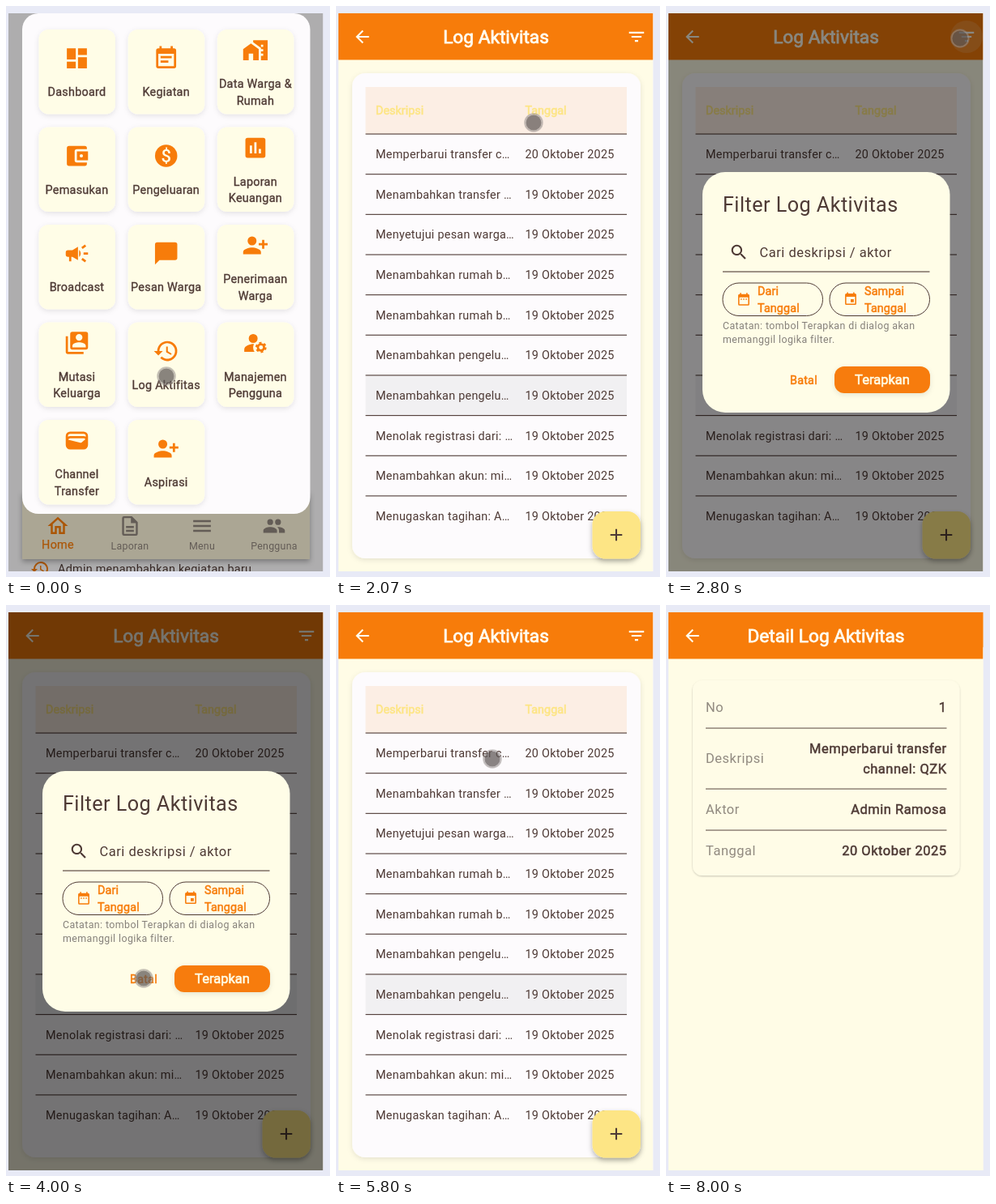
Animation of 400 by 705 pixels, one loop 8.07 s. Source, as an HTML page:

```html
<!DOCTYPE html>
<html lang="id">
<head>
<meta charset="utf-8">
<title>Log Aktivitas</title>
<style>
html, body { margin: 0; width: 100%; height: 100%; overflow: hidden; background: #e8eaf6; }
svg { display: block; width: 400px; height: 705px; font-family: Roboto, Arial, sans-serif; }
text { white-space: pre; }
</style>
</head>
<body>
<svg id="stage" viewBox="0 0 400 705"></svg>
<script>
const LOOP = 8070;
const ORANGE = '#f77c0a', BROWN = '#4e3a35', CREAM = '#fffce6', PAPER = '#fdfbfd', GOLD = '#fde585';
const CX = 197.5, CY = 353;

const icons = {
  dashboard: 'M3 13h8V3H3zm0 8h8v-6H3zm10 0h8V11h-8zm0-18v6h8V3z',
  note: 'M17 10H7v2h10zm2-7h-1V1h-2v2H8V1H6v2H5a2 2 0 0 0-2 2v14a2 2 0 0 0 2 2h14a2 2 0 0 0 2-2V5a2 2 0 0 0-2-2zm0 16H5V8h14zm-5-5H7v2h7z',
  houses: 'M1 11v10h5v-6h4v6h5V11L8 6zM10 3v1.97l7 5V11h2v2h-2v2h2v2h-2v4h6V3zm9 6h-2V7h2z',
  wallet: 'M21 18v1a2 2 0 0 1-2 2H5a2 2 0 0 1-2-2V5a2 2 0 0 1 2-2h14a2 2 0 0 1 2 2v1h-9a2 2 0 0 0-2 2v8a2 2 0 0 0 2 2zm-9-2h10V8H12zm4-2.5a1.5 1.5 0 1 1 0-3 1.5 1.5 0 0 1 0 3z',
  chart: 'M19 3H5a2 2 0 0 0-2 2v14a2 2 0 0 0 2 2h14a2 2 0 0 0 2-2V5a2 2 0 0 0-2-2zM9 17H7v-7h2zm4 0h-2V7h2zm4 0h-2v-4h2z',
  horn: 'M18 11v2h4v-2zm-2 6.6 3.2 2.4 1.2-1.6-3.2-2.4zM20.4 5.6 19.2 4 16 6.4 17.2 8zM4 9a2 2 0 0 0-2 2v2a2 2 0 0 0 2 2h1v4h2v-4h1l5 3V6L8 9zm11.5 3A4.5 4.5 0 0 0 14 8.65v6.7A4.5 4.5 0 0 0 15.5 12z',
  chat: 'M20 2H4a2 2 0 0 0-2 2v18l4-4h14a2 2 0 0 0 2-2V4a2 2 0 0 0-2-2z',
  addUser: 'M13 8a4 4 0 1 0-8 0 4 4 0 0 0 8 0zm2 2v2h3v3h2v-3h3v-2h-3V7h-2v3zM1 18v2h16v-2c0-2.66-5.33-4-8-4s-8 1.34-8 4z',
  album: 'M4 6H2v14a2 2 0 0 0 2 2h14v-2H4zm16-4H8a2 2 0 0 0-2 2v12a2 2 0 0 0 2 2h12a2 2 0 0 0 2-2V4a2 2 0 0 0-2-2zm-6 2a3 3 0 1 1 0 6 3 3 0 0 1 0-6zm6 12H8v-1.5c0-2 4-3 6-3s6 1 6 3z',
  history: 'M13 3a9 9 0 0 0-9 9H1l4 4 4-4H6a7 7 0 1 1 2.06 4.94l-1.42 1.42A9 9 0 1 0 13 3zm-1 5v5l4.28 2.54.72-1.21-3.5-2.08V8z',
  manage: 'M14 8a4 4 0 1 0-8 0 4 4 0 0 0 8 0zM10.67 13C7.5 12.9 2 14.5 2 18v2h9.26a7 7 0 0 1-.59-7z',
  purse: 'M18 4H6a4 4 0 0 0-4 4v8a4 4 0 0 0 4 4h12a4 4 0 0 0 4-4V8a4 4 0 0 0-4-4zm-1.86 9.77a1 1 0 0 1-.88.2L4.15 11.25A2 2 0 0 1 6 10h12c.67 0 1.26.34 1.63.84zM6 6h12a2 2 0 0 1 2 2v.55A4 4 0 0 0 18 8H6a4 4 0 0 0-2 .55V8a2 2 0 0 1 2-2z',
  home: 'M12 5.69l5 4.5V18h-2v-6H9v6H7v-7.81zM12 3 2 12h3v8h6v-6h2v6h6v-8h3z',
  page: 'M8 16h8v2H8zm0-4h8v2H8zm6-10H6a2 2 0 0 0-2 2v16a2 2 0 0 0 2 2h12a2 2 0 0 0 2-2V8zm4 18H6V4h7v5h5z',
  menu: 'M3 18h18v-2H3zm0-5h18v-2H3zm0-7v2h18V6z',
  people: 'M16 11a3 3 0 1 0-3-3 3 3 0 0 0 3 3zm-8 0a3 3 0 1 0-3-3 3 3 0 0 0 3 3zm0 2c-2.33 0-7 1.17-7 3.5V19h14v-2.5C15 14.17 10.33 13 8 13zm8 0-1 .05c1.2.84 2 1.97 2 3.45V19h6v-2.5c0-2.33-4.67-3.5-7-3.5z',
  back: 'M20 11H7.83l5.59-5.59L12 4l-8 8 8 8 1.41-1.41L7.83 13H20z',
  filter: 'M10 18h4v-2h-4zM3 6v2h18V6zm3 7h12v-2H6z',
  search: 'M15.5 14h-.8l-.3-.3a6.5 6.5 0 1 0-.7.7l.3.3v.8l5 5 1.5-1.5zm-6 0a4.5 4.5 0 1 1 0-9 4.5 4.5 0 0 1 0 9z',
  range: 'M9 11H7v2h2zm4 0h-2v2h2zm4 0h-2v2h2zm2-7h-1V2h-2v2H8V2H6v2H5a2 2 0 0 0-2 2v14a2 2 0 0 0 2 2h14a2 2 0 0 0 2-2V6a2 2 0 0 0-2-2zm0 16H5V9h14z',
  event: 'M17 12h-5v5h5zM16 1v2H8V1H6v2H5a2 2 0 0 0-2 2v14a2 2 0 0 0 2 2h14a2 2 0 0 0 2-2V5a2 2 0 0 0-2-2h-1V1zm3 18H5V8h14z',
  plus: 'M19 13h-6v6h-2v-6H5v-2h6V5h2v6h6z'
};

const rect = (x, y, x2, y2, fill, r = 0, extra = '') =>
  `<rect x="${x}" y="${y}" width="${x2 - x}" height="${y2 - y}" rx="${r}" fill="${fill}" ${extra}/>`;
const rule = (x, x2, y, color = BROWN) => rect(x, y - .5, x2, y + .6, color);
const group = (id, body, extra = '') => `<g id="${id}" ${extra}>${body}</g>`;

function label(s, x, y, { size = 14.4, gap = .26, fill = BROWN, at = 'start', bold = 0, weight = 400 } = {}) {
  const heavy = bold ? `stroke="${fill}" stroke-width="${bold}"` : '';
  return `<text x="${x}" y="${y}" font-size="${size}" letter-spacing="${gap}" fill="${fill}" text-anchor="${at}" font-weight="${weight}" ${heavy}>${s}</text>`;
}

function icon(name, x, y, size, fill) {
  let body;
  if (name === 'coin') {
    body = `<circle cx="12" cy="12" r="10"/>` +
      label('$', 12, 17.6, { size: 16, gap: 0, fill: CREAM, at: 'middle', weight: 500 });
  } else {
    body = `<path fill-rule="evenodd" d="${icons[name]}"/>`;
    if (name === 'manage') body += `<g fill="none" stroke="${fill}">
      <circle cx="17" cy="16" r="2.8" stroke-width="2"/>
      <circle cx="17" cy="16" r="4.2" stroke-width="1.6" stroke-dasharray="2.2 2.198"/></g>`;
  }
  const k = size / 24;
  return `<g fill="${fill}" transform="translate(${x - size / 2} ${y - size / 2}) scale(${k})">${body}</g>`;
}

const appBar = (title, withFilter) =>
  rect(3, 9, 391.5, 66.5, ORANGE) + icon('back', 32.5, 38, 24.7, '#fffdf0') +
  label(title, CX, 45.5, { size: 22.7, gap: 0, fill: '#fffdf0', at: 'middle', bold: .8 }) +
  (withFilter ? icon('filter', 371, 38, 24.7, '#fffdf0') : '');

function homePage() {
  const tabs = [['home', 'Home', 64], ['page', 'Laporan', 153], ['menu', 'Menu', 242], ['people', 'Pengguna', 331]];
  return rect(3, 9, 391.5, 698, '#fbfafb') +
    icon('history', 42, 695, 24, ORANGE) + label('Admin menambahkan kegiatan baru', 64, 700) +
    rect(20, 600, 375, 683, '#f8f0d6', 0, 'filter="url(#lift)"') +
    tabs.map(([name, text, x], i) => {
      const fill = i ? '#8f857d' : ORANGE;
      return icon(name, x, 642, i ? 29 : 30, fill) +
        label(text, x, i ? 670.5 : 669.5, { size: i ? 12.4 : 14.4, fill, at: 'middle', bold: i ? 0 : .25 });
    }).join('');
}

function menuSheet() {
  const items = [
    ['dashboard', 'Dashboard'], ['note', 'Kegiatan'], ['houses', 'Data Warga &amp;', 'Rumah'],
    ['wallet', 'Pemasukan'], ['coin', 'Pengeluaran'], ['chart', 'Laporan', 'Keuangan'],
    ['horn', 'Broadcast'], ['chat', 'Pesan Warga'], ['addUser', 'Penerimaan', 'Warga'],
    ['album', 'Mutasi', 'Keluarga'], ['history', 'Log Aktifitas'], ['manage', 'Manajemen', 'Pengguna'],
    ['purse', 'Channel', 'Transfer'], ['addUser', 'Aspirasi']
  ];
  return rect(20, 9, 375.5, 627, PAPER, 20) + items.map(([name, a, b], i) => {
    const x = 40.5 + (i % 3) * 110.2, y = 29 + Math.floor(i / 3) * 120.5, mid = x + 47;
    const line = (s, dy) => label(s, mid, y + dy, { at: 'middle', bold: .35 });
    return rect(x, y, x + 94.5, y + 104.5, '#fffde7', 12, 'filter="url(#soft)"') +
      icon(name, mid, y + (b ? 25.5 : 35.5), 33, ORANGE) +
      (b ? line(a, 72) + line(b, 92.5) : line(a, 82));
  }).join('');
}

function listPage() {
  const rows = ['Memperbarui transfer c…', 'Menambahkan transfer …', 'Menyetujui pesan warga…',
    'Menambahkan rumah b…', 'Menambahkan rumah b…', 'Menambahkan pengelu…', 'Menambahkan pengelu…',
    'Menolak registrasi dari: …', 'Menambahkan akun: mi…', 'Menugaskan tagihan: A…'];
  const top = i => 158 + i * 49.65;
  const head = { fill: GOLD, bold: .6, gap: 0 };
  return rect(3, 9, 391.5, 698, CREAM) + appBar('Log Aktivitas', true) +
    `<circle id="hover" cx="371" cy="38" r="20" fill="#fff" fill-opacity=".14"/>` +
    rect(20, 83, 376, 682, PAPER, 16, 'filter="url(#soft)"') +
    rect(36.5, 100, 359, 158, '#fceee4') +
    label('Deskripsi', 49, 134, head) + label('Tanggal', 233.5, 134, head) +
    rect(36.5, top(6), 359, top(7), '#f1f0f2', 0, 'id="rowHover"') +
    rows.map((s, i) => rule(36.5, 359, top(i)) + label(s, 49, top(i) + 30) +
      label(`${i ? 19 : 20} Oktober 2025`, 233.5, top(i) + 30)).join('') +
    rect(316.5, 624, 376, 682.5, GOLD, 16, 'filter="url(#lift)"') + icon('plus', 346, 653, 25, BROWN);
}

function filterDialog() {
  const button = (x, name, a) =>
    rect(x, 342, x + 123.5, 382.5, 'none', 20, `stroke="${BROWN}"`) + icon(name, x + 26, 362, 18.5, ORANGE) +
    [a, 'Tanggal'].map((s, i) => label(s, x + 43, 357 + i * 20.5, { fill: ORANGE, bold: .5, gap: .1 })).join('');
  const note = { size: 12.4, gap: .41, fill: '#85807a' };
  return rect(45, 205, 350.5, 502, '#fffde7', 28) +
    label('Filter Log Aktivitas', 70, 254, { size: 25.2, gap: .45 }) +
    icon('search', 90, 304, 24.7, BROWN) +
    label('Cari deskripsi / aktor', 115.5, 309.5, { size: 16.5, gap: .5 }) +
    rule(70, 325.5, 328) + button(70, 'range', 'Dari') + button(202, 'event', 'Sampai') +
    label('Catatan: tombol Terapkan di dialog akan', 70, 399, note) +
    label('memanggil logika filter.', 70, 415.5, note) +
    label('Batal', 153, 466.5, { fill: ORANGE, bold: .5, gap: .2 }) +
    rect(208, 445, 326, 478, ORANGE, 12, 'filter="url(#soft)"') +
    label('Terapkan', 267, 467, { size: 16.5, gap: 0, fill: '#fffde7', at: 'middle', bold: .6 });
}

function detailPage() {
  const key = (s, y) => label(s, 49, y, { size: 16.5, gap: .5, fill: '#918a80' });
  const value = (s, y) => label(s, 346.5, y, { size: 16.5, gap: .5, at: 'end', bold: .5 });
  return rect(3, 9, 391.5, 698, CREAM) + appBar('Detail Log Aktivitas') +
    rect(33, 93, 362.5, 334, '#fffce7', 12, 'filter="url(#thin)"') +
    key('No', 132) + value('1', 132) +
    key('Deskripsi', 195) + value('Memperbarui transfer', 182.5) + value('channel: QZK', 207.5) +
    key('Aktor', 258) + value('Admin Ramosa', 258) +
    key('Tanggal', 309) + value('20 Oktober 2025', 309) +
    [152, 227, 278].map(y => rule(49, 346.5, y, '#685850')).join('');
}

const shadow = (id, dy, blur, a) => `<filter id="${id}" x="-20%" y="-20%" width="140%" height="150%">
  <feDropShadow dx="0" dy="${dy}" stdDeviation="${blur}" flood-color="#000" flood-opacity="${a}"/></filter>`;

const stage = document.getElementById('stage');
stage.innerHTML = `<defs>${shadow('soft', 2, 3, .1)}${shadow('lift', 3, 3, .3)}${shadow('thin', 1, .8, .22)}
  <clipPath id="screen">${rect(3, 9, 391.5, 698, '#000')}</clipPath></defs>
  <g clip-path="url(#screen)">` +
  group('home', homePage()) + rect(3, 9, 391.5, 698, '#000', 0, 'id="shade"') + group('sheet', menuSheet()) +
  group('list', listPage()) + rect(3, 9, 391.5, 698, '#000', 0, 'id="barrier"') +
  group('dialog', filterDialog()) + group('detail', detailPage()) + '</g>' +
  group('touch', '<circle r="10.8" fill="#aaa4a2" fill-opacity=".35" stroke="#8d8886" stroke-opacity=".45" stroke-width="2"/>' +
    '<circle r="9.5" fill="#4a4342" fill-opacity=".58"/>');

const el = Object.fromEntries([...stage.querySelectorAll('[id]')].map(n => [n.id, n]));
const ramp = (t, from, span) => Math.min(1, Math.max(0, (t - from) / span));
const smooth = p => p * p * (3 - 2 * p);
const easeOut = p => 1 - (1 - p) ** 3;

const OPEN_LIST = 330, OPEN_DETAIL = 6250, ZOOM = 410;
// time, x, y
const path = [[0, 198, 457], [950, 198, 457], [2070, 244, 144], [2450, 370, 39], [2800, 363, 40], [3050, 363, 40],
  [3850, 170, 461], [4300, 170, 461], [4600, 167, 306], [5250, 190, 200], [5800, 193, 190], [6950, 193, 190], [7500, 170, -20], [LOOP, 170, -20]];

function touchAt(t) {
  const i = path.findIndex(k => k[0] > t);
  const [a, b] = [path[i - 1], path[i]];
  const p = smooth(ramp(t, a[0], b[0] - a[0]));
  return [a[1] + (b[1] - a[1]) * p, a[2] + (b[2] - a[2]) * p];
}

function zoom(node, k, alpha = 1) {
  node.setAttribute('transform', `translate(${CX} ${CY}) scale(${k}) translate(${-CX} ${-CY})`);
  fade(node, alpha);
}

function fade(node, alpha) {
  node.setAttribute('opacity', alpha);
  node.setAttribute('display', alpha > 0 ? 'inline' : 'none');
}

function draw(t) {
  const drop = smooth(ramp(t, 130, 240));
  el.sheet.setAttribute('transform', `translate(0 ${drop * 700})`);
  fade(el.shade, .31 * (1 - drop));

  const list = easeOut(ramp(t, OPEN_LIST, ZOOM));
  const detail = easeOut(ramp(t, OPEN_DETAIL, ZOOM));
  zoom(el.home, 1 + .05 * list);
  zoom(el.list, detail ? 1 + .05 * detail : .85 + .15 * list, ramp(t, OPEN_LIST, 90));
  zoom(el.detail, .85 + .15 * detail, ramp(t, OPEN_DETAIL, 90));

  fade(el.rowHover, ramp(t, 700, 100));
  fade(el.hover, ramp(t, 2400, 60) * (1 - ramp(t, 3050, 100)));
  const close = 1 - ramp(t, 4290, 150);
  fade(el.barrier, .54 * easeOut(ramp(t, 2670, 270)) * close);
  fade(el.dialog, easeOut(ramp(t, 2640, 150)) * close);

  el.touch.setAttribute('transform', `translate(${touchAt(t).join(' ')})`);
}

function tick() {
  draw((performance.now() - start) % LOOP);
  requestAnimationFrame(tick);
}
const start = performance.now();
tick();
</script>
</body>
</html>
```
